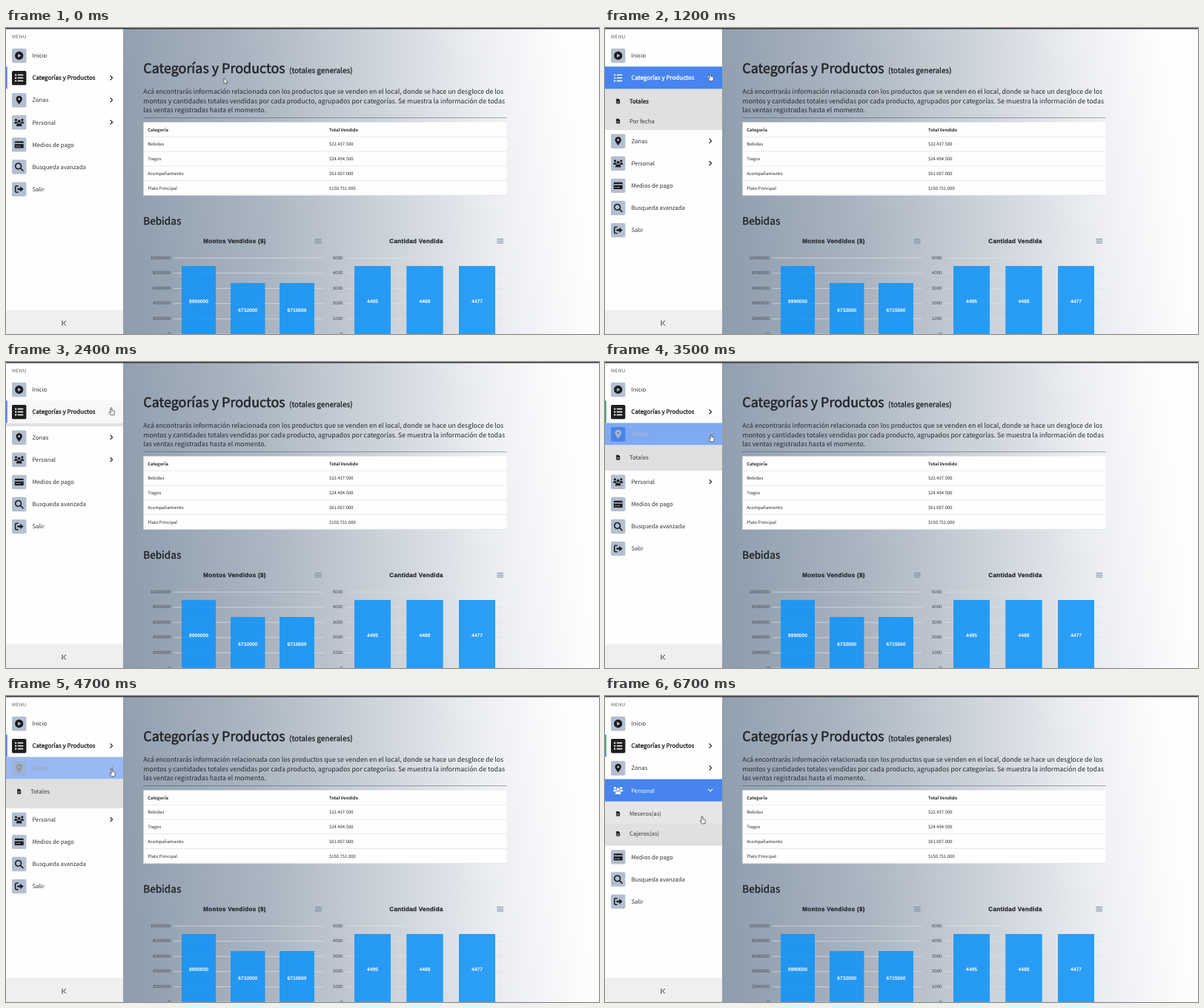
An HTML page with a canvas that plays this animation: 800x414 px, repeating every 6800 ms.

```html
<!DOCTYPE html>
<html lang="es">
<head>
<meta charset="utf-8">
<title>Panel de ventas</title>
<style>
html, body { margin: 0; width: 100%; height: 100%; overflow: hidden; background: #fff; }
canvas { display: block; width: 800px; height: 414px; }
</style>
</head>
<body>
<canvas id="stage" width="800" height="414"></canvas>
<script>
const ctx = document.getElementById('stage').getContext('2d');
const LOOP = 6800, STEP = 100;
const SANS = '"Noto Sans CJK JP", "Noto Sans CJK", "Noto Sans CJK KR", "Noto Sans", sans-serif';
const ARIAL = '"Liberation Sans", Arial, sans-serif';
const BLUE = [71, 132, 238], WHITE = [255, 255, 255], INK = [27, 28, 31], BOX = [179, 191, 208];

const mix = (a, b, p) => a.map((v, i) => Math.round(v + (b[i] - v) * p));
const rgb = c => `rgb(${c})`;

// Piecewise linear track of [time, ...values]
function track(keys, t) {
  let i = 0;
  while (i < keys.length - 1 && keys[i + 1][0] <= t) i++;
  const a = keys[i], b = keys[i + 1];
  if (!b || t <= a[0]) return a.slice(1);
  const p = (t - a[0]) / (b[0] - a[0]);
  return a.slice(1).map((v, k) => v + (b[k + 1] - v) * p);
}

function rect(x, y, w, h, fill, r = 0) {
  ctx.fillStyle = fill;
  ctx.beginPath();
  ctx.roundRect(x, y, w, h, r);
  ctx.fill();
}

function line(x1, y1, x2, y2, color, width = 1) {
  ctx.strokeStyle = color;
  ctx.lineWidth = width;
  ctx.beginPath();
  ctx.moveTo(x1, y1);
  ctx.lineTo(x2, y2);
  ctx.stroke();
}

// y is the middle of the capitals; heavy adds a thin outline
function text(s, x, y, size, color, o = {}) {
  ctx.font = `${o.weight || 400} ${size}px ${o.font || SANS}`;
  ctx.textRendering = 'geometricPrecision';
  ctx.textAlign = o.align || 'left';
  ctx.letterSpacing = (o.spacing || 0) + 'px';
  ctx.fillStyle = color;
  const base = y + size * 0.36;
  ctx.fillText(s, x, base);
  if (o.heavy) {
    ctx.strokeStyle = color;
    ctx.lineWidth = o.heavy;
    ctx.lineJoin = 'round';
    ctx.strokeText(s, x, base);
  }
  ctx.letterSpacing = '0px';
}

function path(d, fill, stroke, width = 1) {
  const p = new Path2D(d);
  if (fill) { ctx.fillStyle = fill; ctx.fill(p); }
  if (stroke) {
    ctx.strokeStyle = stroke;
    ctx.lineWidth = width;
    ctx.lineJoin = ctx.lineCap = 'round';
    ctx.stroke(p);
    ctx.lineCap = 'butt';
  }
}

function disc(x, y, r, fill) {
  ctx.fillStyle = fill;
  ctx.beginPath();
  ctx.arc(x, y, r, 0, 7);
  ctx.fill();
}

function at(x, y, draw, turn = 0) {
  ctx.save();
  ctx.translate(x, y);
  ctx.rotate(turn);
  draw();
  ctx.restore();
}

const icons = {
  play(c, bg) {
    disc(0, 0, 5.6, c);
    path('M-1.6-2.6L2.8 0L-1.6 2.6Z', bg);
  },
  list(c) {
    for (const y of [-4, 0, 4]) {
      rect(-5.6, y - 1, 2.1, 2.1, c, 0.4);
      rect(-2, y - 0.7, 7.6, 1.5, c, 0.4);
    }
  },
  pin(c, bg) {
    path('M0 5.8C-1.5 3.4-4.2.8-4.2-1.6A4.2 4.2 0 0 1 4.2-1.6C4.2.8 1.5 3.4 0 5.8Z', c);
    disc(0, -1.6, 1.5, bg);
  },
  people(c, bg) {
    for (const s of [-1, 1]) {
      disc(4.2 * s, -3.4, 1.6, c);
      path(`M${1.5 * s} 1.6Q${2 * s}-1.2 ${4.2 * s}-1.2Q${6.6 * s}-1.2 ${6.6 * s} 1.6Z`, c);
    }
    disc(0, -1.5, 2, c);
    path('M-4 5.2Q-4 1.2-1.6 1.2H1.6Q4 1.2 4 5.2Z', c, bg, 0.5);
  },
  card(c, bg) {
    rect(-6, -4.6, 12, 9.4, c, 1.2);
    rect(-6, -2.3, 12, 1.5, bg);
    rect(-4.4, 1.8, 2.2, 0.9, bg);
    rect(-1.4, 1.8, 3.4, 0.9, bg);
  },
  search(c) {
    path('M2.8-1A3.9 3.9 0 1 1-5-1A3.9 3.9 0 1 1 2.8-1M2 2L5.2 5.2', null, c, 1.6);
  },
  exit(c) {
    path('M-1.6-4.2H-3.6Q-5-4.2-5-2.8V2.8Q-5 4.2-3.6 4.2H-1.6', null, c, 1.6);
    path('M-2.2-1.2H1.6V-3.8L5.9 0L1.6 3.8V1.2H-2.2Z', c);
  },
  file(c) {
    path('M-2.4-3.3H.7L2.5-1.5V3.3H-2.4Z', c);
    rect(-1.3, 0, 2.6, 0.6, '#d8d6d6');
    rect(-1.3, 1.4, 2.6, 0.6, '#d8d6d6');
  }
};

const menu = [
  { label: 'Inicio', icon: 'play' },
  { label: 'Categorías y Productos', icon: 'list', active: true, subs: ['Totales', 'Por fecha'], open: 1000, close: 2100 },
  { label: 'Zonas', icon: 'pin', subs: ['Totales', 'Por fecha'], open: 3400, close: 4600 },
  { label: 'Personal', icon: 'people', subs: ['Meseros(as)', 'Cajeros(as)'], open: 6000, close: 9000 },
  { label: 'Medios de pago', icon: 'card' },
  { label: 'Busqueda avanzada', icon: 'search' },
  { label: 'Salir', icon: 'exit' }
];

// Submenu height and blue amount
function slide(m, t) {
  if (!m.subs) return [0, 0];
  if (t < m.close) return track([[m.open, 0, 0], [m.open + 100, 34.5, 0.68], [m.open + 200, 55.5, 1], [m.open + 300, 60, 1]], t);
  return track([[m.close, 60, 1], [m.close + 100, 39.5, 0.54], [m.close + 200, 18, 0.22], [m.close + 300, 4.5, 0], [m.close + 400, 0, 0]], t);
}

const pointer = [
  [0, 294, 68], [100, 288, 68], [400, 215, 66], [700, 148, 63], [900, 142, 62], [1400, 142, 62],
  [1600, 124, 94], [1800, 118, 120], [1900, 122, 112], [2100, 142, 62], [2800, 142, 62],
  [3200, 143, 98], [3600, 143, 98], [3900, 124, 130], [4100, 124, 146], [4400, 143, 99],
  [5000, 143, 99], [5500, 142, 129], [6300, 142, 129], [6600, 131, 163]
];

function submenu(m, top, h, px, py) {
  ctx.save();
  ctx.beginPath();
  ctx.rect(0, top, 158, h);
  ctx.clip();
  rect(0, top, 158, h, '#e1dfdf');
  m.subs.forEach((s, i) => {
    const y = top + 16.5 + i * 27, y0 = top + i * 30;
    if (px < 158 && py >= y0 && py < y0 + 30) rect(0, y0, 158, 30, '#e7e6e6');
    at(17.6, y, () => icons.file('#1c1c1e'));
    const now = m.active && i === 0;
    text(s, 33, y, 7.75, now ? '#1c1c1e' : '#3a3a3c', { heavy: now ? 0.3 : 0 });
  });
  ctx.restore();
}

function sidebar(t, px, py) {
  rect(0, 0, 158, 414, '#fefefe');
  text('MENU', 8, 12.2, 6.3, '#55585c', { spacing: 0.5 });
  let y = 37.2;
  for (const m of menu) {
    const [h, p] = slide(m, t), top = y - 15;
    const over = px < 158 && py >= top && py < top + 30;
    const closing = t >= m.close && t < m.close + 400;
    const bg = mix(over ? [247, 247, 248] : [254, 254, 254], BLUE, p);
    if (over || p) rect(0, top, 158, 30.2, rgb(bg));
    if (m.active) rect(0, top, 1.7, 30, rgb(BLUE));

    const lit = closing ? p * 0.4 : over ? 1 : p;
    const box = m.active ? mix([31, 31, 33], BLUE, p) : mix(BOX, BLUE, lit);
    const ink = mix(INK, WHITE, p);
    rect(8, y - 9.4, 19.4, 19.4, rgb(box), 1.8);
    at(17.7, y + 0.2, () => icons[m.icon](m.active ? '#fff' : rgb(ink), rgb(box)));
    if (m.active) text(m.label, 35.4, y + 0.3, 7.97, rgb(ink), { heavy: 0.3 });
    else text(m.label, 35.4, y + 0.3, 7.75, rgb(mix([50, 52, 56], WHITE, p)));
    if (m.subs) at(142.2, y, () => path('M-1.3-2.7L1.4 0L-1.3 2.7', null, rgb(ink), 1.2), p * Math.PI / 2);
    if (h) submenu(m, top + 30.2, h, px, py);
    y += 30.1 + h;
  }
  rect(0, 381.5, 158, 33, '#efeff0');
  at(78, 399.3, () => path('M-2-3V3M2.6-3L-.2 0L2.6 3', null, '#2b2b2d', 1));
}

function chart(title, mid, x0, x1, burger, labelX, labels, bars, max) {
  const y0 = 414, full = 102.8;
  text(title, mid, 288.2, 8, '#22262a', { font: ARIAL, weight: 700, align: 'center', spacing: 0.33, heavy: 0.25 });
  for (const dy of [-2.6, 0, 2.6]) line(burger, 288.3 + dy, burger + 8.8, 288.3 + dy, '#6e8192', 1);
  labels.forEach((s, i) => {
    const y = y0 - full + i * full / 5;
    line(x0, y, x1, y, 'rgba(224,226,229,.85)', 0.8);
    text(s, labelX, y - 0.7, 6.15, '#43494e', { font: ARIAL, align: 'right' });
  });
  for (const [x, w, v] of bars) {
    const h = v / max * full, top = Math.round(y0 - h + 0.4);
    rect(x, top, w, y0 - top, 'rgba(15,148,249,.87)');
    text(String(v), x + w / 2, y0 - h / 2 + 1.8, 6.68, '#fff', { font: ARIAL, weight: 700, align: 'center' });
  }
}

const story = [
  'Acá encontrarás información relacionada con los productos que se venden en el local, donde se hace un desgloce de los',
  'montos y cantidades totales vendidas por cada producto, agrupados por categorías. Se muestra la información de todas',
  'las ventas registradas hasta el momento.'
];
const table = [
  ['Categoría', 'Total Vendido'],
  ['Bebidas', '$22.437.500'],
  ['Tragos', '$24.494.500'],
  ['Acompañamiento', '$61.007.000'],
  ['Plato Principal', '$150.751.000']
];

function page() {
  const g = ctx.createLinearGradient(160, 250, 765, 190);
  g.addColorStop(0, '#8f9dad');
  g.addColorStop(0.3, '#aab5c1');
  g.addColorStop(0.6, '#cfd5dc');
  g.addColorStop(0.82, '#eceef2');
  g.addColorStop(1, '#fdfdfe');
  rect(158, 0, 642, 414, g);

  text('Categorías y Productos', 185.3, 55, 17.92, '#212327', { heavy: 0.5 });
  text('(totales generales)', 382.1, 57.9, 9.98, '#212327', { heavy: 0.3 });
  story.forEach((s, i) => text(s, 185.3, 86.3 + i * 12.4, 8.77, '#26292e'));
  line(185.3, 121.5, 675.5, 121.5, 'rgba(50,58,68,.42)');

  rect(185.5, 127.4, 490, 99, '#fefefe');
  table.forEach((row, i) => {
    const y = 137.4 + i * 19.8;
    row.forEach((s, k) => text(s, k ? 436 : 191.2, y, 5.85, '#24272b', { weight: i ? 400 : 700 }));
    line(185.5, y + 9.7, 675.5, y + 9.7, '#dee2e6', 0.8);
  });

  text('Bebidas', 185.3, 260.7, 13.57, '#212327', { heavy: 0.4 });
  chart('Montos Vendidos ($)', 308.5, 226, 428, 416.9, 222,
    ['10000000', '8000000', '6000000', '4000000', '2000000', '0'],
    [[237, 46, 8990000], [303, 46.5, 6732000], [369, 47, 6715500]], 1e7);
  chart('Cantidad Vendida', 553.5, 459, 673.3, 662.3, 454.5,
    ['5000', '4000', '3000', '2000', '1000', '0'],
    [[470, 49, 4495], [540.3, 49.4, 4488], [611, 49, 4477]], 5000);
}

function cursor(x, y) {
  at(x, y, () => {
    if (x > 158) path('M0 0V7.4L1.7 5.9L2.9 8.4L4.1 7.8L3 5.4H5.2Z', '#fff', '#3c4046', 0.7);
    else path('M-.9 5.6V.7Q-.9-.3 0-.3T.9.7V3.6L3.6 4.1Q4.5 4.4 4.4 5.4L3.8 9.8H-.6L-3 6.4Q-2.8 5.2-1.8 5.5L-.9 6.4Z', '#fff', '#33363b', 0.75);
  });
}

function draw(t) {
  const [px, py] = track(pointer, t);
  page();
  sidebar(t, px, py);
  rect(0, 0, 800, 1.4, '#3b3b3f');
  cursor(px, py);
}

const start = performance.now();
function frame() {
  const t = (performance.now() - start) % LOOP;
  draw(Math.floor(t / STEP) * STEP);
  requestAnimationFrame(frame);
}
frame();
</script>
</body>
</html>
```
